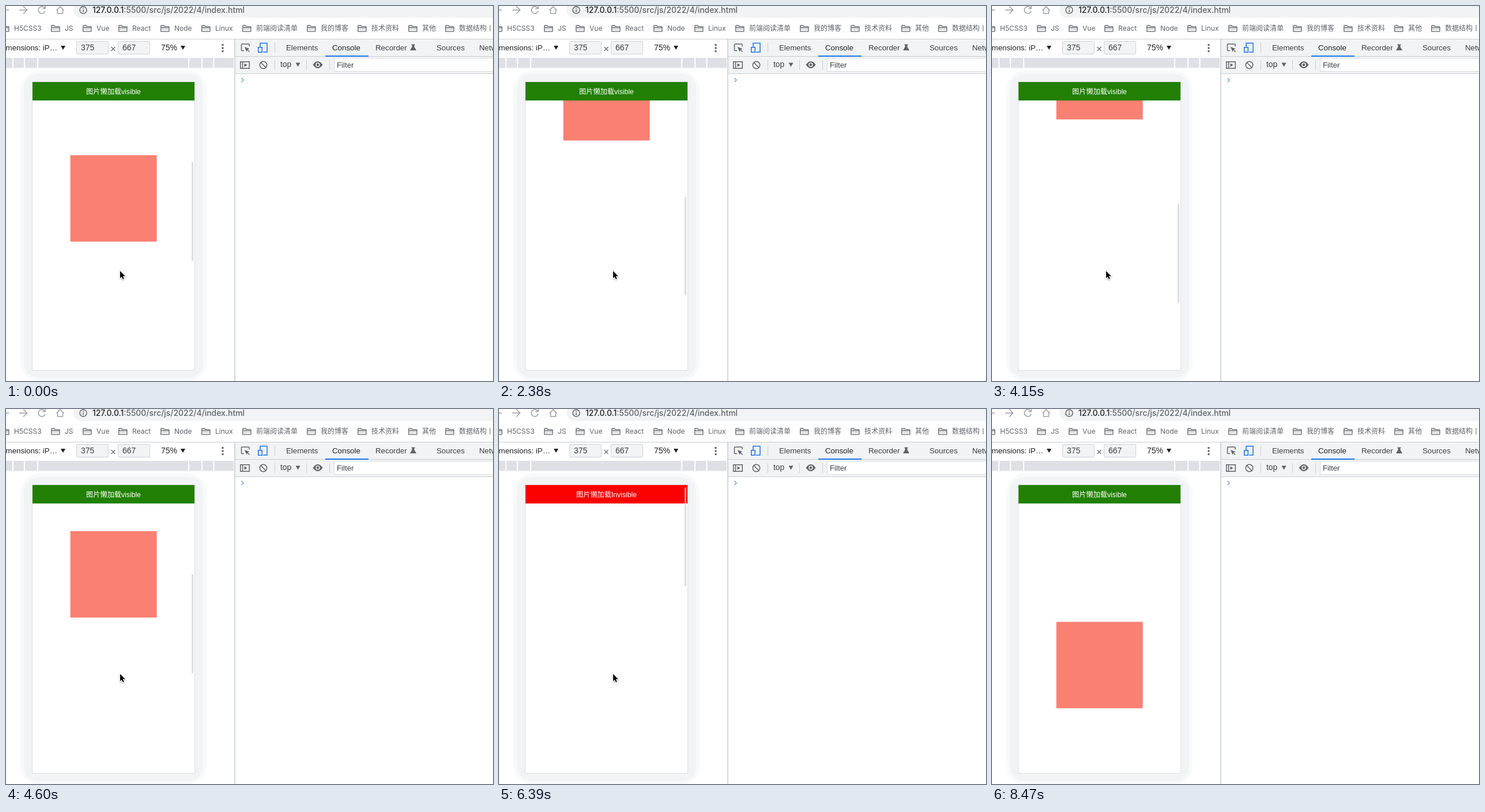
Recreate the animation shown at these times as an HTML page. Size 845 by 651 pixels, loop 9220 ms.

```html
<!DOCTYPE html>
<html lang="zh">
<head>
<meta charset="utf-8">
<title>图片懒加载</title>
<style>
  @property --y { syntax: "<number>"; inherits: true; initial-value: 259; }

  html, body { margin: 0; width: 100%; height: 100%; overflow: hidden; background: #fff; }
  svg { display: block; width: 845px; height: 651px; }
  text { font: 13.3px "Liberation Sans", Arial, "Noto Sans CJK SC", "Noto Sans CJK", sans-serif; fill: #3c4043; white-space: pre; }
  .bookmarks text { font: 12px Inter, "Noto Sans CJK SC", "Noto Sans CJK", sans-serif; fill: #5f6368; }
  .url { font: 500 13.95px Inter, sans-serif; fill: #5f6368; }
  .dark { fill: #202124; }
  .title text { font-size: 12.2px; font-weight: 500; fill: #fff; text-anchor: middle; }
  .line { fill: none; stroke: #5f6368; stroke-width: 1.5; }
  .edge { fill: none; stroke: #cacdd1; }

  /* --y is the top of the square; the scroll thumb follows it */
  .screen { animation: scroll 9.22s infinite; }
  .square { transform: translateY(calc(var(--y) * 1px)); }
  .thumb { transform: translateY(calc((271 - (var(--y) - 259) * .3425) * 1px)); animation: fade 9.22s infinite; }
  .hidden { animation: flag 9.22s step-end infinite; }
  .cursor { animation: leave 9.22s infinite; filter: drop-shadow(0 1px 1px #0005); }

  @keyframes scroll {
    0%     { --y: 259; animation-timing-function: steps(8); }
    12.9%  { --y: 204; animation-timing-function: steps(2); }
    16.15% { --y: 180; animation-timing-function: step-end; }
    19.3%  { --y: 180; animation-timing-function: steps(8); }
    32.21% { --y: -13; animation-timing-function: steps(3); }
    36.98% { --y: -77; animation-timing-function: step-end; }
    38.61% { --y: -77; animation-timing-function: steps(7); }
    49.89% { --y: 212; animation-timing-function: steps(6); }
    59.54% { --y: 426; animation-timing-function: steps(3); }
    64.42% { --y: 554; animation-timing-function: steps(2); }
    67.67% { --y: 640; animation-timing-function: step-end; }
    69.3%  { --y: 653; animation-timing-function: step-end; }
    70.93% { --y: 656; animation-timing-function: steps(3); }
    75.81% { --y: 640; animation-timing-function: step-end; }
    77.33% { --y: 618; animation-timing-function: steps(3); }
    82.21% { --y: 400; animation-timing-function: step-end; }
    83.83%, 100% { --y: 369.5; animation-timing-function: step-end; }
  }
  @keyframes fade {
    0%, 86.98% { opacity: 1; animation-timing-function: steps(2); }
    90.23%, 100% { opacity: 0; }
  }
  @keyframes flag {
    0%, 41.86%, 77.33%, 100% { opacity: 0; }
    33.83%, 67.67% { opacity: 1; }
  }
  @keyframes leave {
    0%, 85.46% { transform: none; opacity: 1; animation-timing-function: steps(3); }
    90.23% { transform: translate(415px, 38px); opacity: 1; animation-timing-function: step-end; }
    91.86%, 100% { transform: translate(415px, 38px); opacity: 0; }
  }
</style>
</head>
<body>
<svg viewBox="0 0 845 651">
  <defs>
    <g id="folder" stroke="#5f6368" stroke-width="1.2">
      <path d="M.7 43.5V34.7q0-1 1-1H5.5l1.5 1.8h7q1 0 1 1v7q0 1-1 1H1.7q-1 0-1-1z" fill="#e3e4e6"/>
      <path d="M.7 37.5h14.3" fill="none"/>
    </g>
    <path id="caret" d="M0 0h8l-4 7z"/>
    <clipPath id="viewport"><path d="M46 132h281v500H46z"/></clipPath>
  </defs>
  <path d="M0 0h845v651H0z" fill="#fff"/>

  <!-- address bar -->
  <rect x="117" y="-7" width="760" height="27.5" rx="13.7" fill="#f1f3f4"/>
  <g class="line">
    <g stroke="#9aa0a6">
      <path d="M-2 7H5M23 7h13M30 .5L36.5 7L30 13.5"/>
      <path d="M67 3.5A6 6 0 1 0 68 8.5M68 -1v5.5h-5"/>
      <path d="M87.5 7.5L94 1l6.5 6.5M89.5 6v7h9V6"/>
    </g>
    <circle cx="134" cy="7" r="6"/>
    <path d="M134 6v4.5M134 3v1.7"/>
  </g>
  <text class="url" x="150" y="12"><tspan class="dark">127.0.0.1</tspan>:5500/src/js/2022/4/index.html</text>

  <!-- bookmarks -->
  <g class="bookmarks">
    <g transform="translate(-10)"><use href="#folder"/><text x="24" y="43">H5CSS3</text></g>
    <g transform="translate(78)"><use href="#folder"/><text x="24" y="43">JS</text></g>
    <g transform="translate(133)"><use href="#folder"/><text x="24" y="43">Vue</text></g>
    <g transform="translate(195)"><use href="#folder"/><text x="24" y="43">React</text></g>
    <g transform="translate(268)"><use href="#folder"/><text x="24" y="43">Node</text></g>
    <g transform="translate(339)"><use href="#folder"/><text x="24" y="43">Linux</text></g>
    <g transform="translate(410)"><use href="#folder"/><text x="24" y="43">前端阅读清单</text></g>
    <g transform="translate(522)"><use href="#folder"/><text x="24" y="43">我的博客</text></g>
    <g transform="translate(610)"><use href="#folder"/><text x="24" y="43">技术资料</text></g>
    <g transform="translate(698)"><use href="#folder"/><text x="24" y="43">其他</text></g>
    <g transform="translate(762)"><use href="#folder"/><text x="24" y="43">数据结构丨</text></g>
  </g>
  <path class="edge" d="M0 57.5h845"/>

  <!-- device toolbar -->
  <text class="dark" x="89" y="77" text-anchor="end">mensions: iP…</text>
  <use href="#caret" x="95" y="69" fill="#202124"/>
  <g fill="#f1f3f4" stroke="#cfd1d4">
    <rect x="122.5" y="61.5" width="55" height="22" rx="2"/>
    <rect x="194.5" y="61.5" width="55" height="22" rx="2"/>
  </g>
  <text x="130" y="77" style="font-size:14px">375</text>
  <text x="202" y="77" style="font-size:14px">667</text>
  <path class="line" d="M182.5 71l7 7m0-7l-7 7" style="stroke-width:1.2"/>
  <text class="dark" x="269" y="77" style="font-size:14px">75%</text>
  <use href="#caret" x="303" y="69" fill="#202124"/>
  <g fill="#5f6368">
    <circle cx="376" cy="67.5" r="1.8"/><circle cx="376" cy="73" r="1.8"/><circle cx="376" cy="78.5" r="1.8"/>
  </g>
  <path d="M0 90h395v17.5H0z" fill="#dfe0e5"/>
  <path d="M12 90v18M32 90v18M55 90v18M317 90v18M340 90v18M360.5 90v18" stroke="#fff" stroke-width="2"/>

  <!-- phone -->
  <rect x="25" y="112" width="323" height="540" rx="34" fill="#f8f9fa"/>
  <rect x="31" y="118" width="311" height="528" rx="26" fill="#f1f3f4"/>
  <path d="M45.5 131.5h282v501h-282z" fill="#fff" stroke="#dddfe2"/>
  <g class="screen" clip-path="url(#viewport)">
    <rect class="square" x="111.6" width="150" height="150" fill="#fa8072"/>
    <g class="title">
      <path d="M46 132h281v32H46z" fill="#218003"/>
      <text x="186.5" y="153">图片懒加载visible</text>
      <g class="hidden">
        <path d="M46 132h281v32H46z" fill="#fb0000"/>
        <text x="186.5" y="153">图片懒加载Invisible</text>
      </g>
    </g>
    <rect class="thumb" x="322" width="3" height="171.5" rx="1" fill="#d0d2d6" fill-opacity=".75"/>
  </g>

  <!-- developer tools -->
  <path d="M398 58h447v59H398z" fill="#f1f3f4"/>
  <path class="edge" d="M397 58v593" stroke-width="2" stroke-opacity=".8"/>
  <path class="edge" d="M398 87.5h447M398 117.5h447M466.5 64v17M466.5 94v17M521.5 94v17M561.5 94v17"/>
  <path d="M554 86h75v2h-75z" fill="#1a73e8"/>
  <path d="M846 90.5H569.5v23H846" fill="#fff" stroke="#dadce0"/>
  <g class="line">
    <path d="M413 77.5h-3.5q-1 0-1-1V67q0-1 1-1H421q1 0 1 1v3"/>
    <path d="M414 71l8.5 3.3-3.6 1.5-1.5 3.6z" fill="#5f6368" stroke="none"/>
    <path d="M418.5 75.5l4 4"/>
    <path d="M406.75 96.75h15.5v11.5h-15.5zM410.5 97v11"/>
    <path d="M413.5 99.5v6l5-3z" fill="#5f6368" stroke="none"/>
    <circle cx="446.5" cy="102.5" r="6.2"/>
    <path d="M442 98l9 9"/>
    <path d="M441 72v-7.5h12v15.5h-7" stroke="#1a73e8"/>
    <path d="M437.75 71.75h6.5v8.5h-6.5z" stroke="#1a73e8"/>
    <path d="M408.5 125l3.5 3.5-3.5 3.5" stroke="#6fa5ea"/>
  </g>
  <path d="M532.5 102q8.5-12 17 0q-8.5 12-17 0z" fill="#5f6368"/>
  <circle cx="541" cy="102" r="3.8" fill="#f1f3f4"/>
  <circle cx="541" cy="102" r="2.2" fill="#5f6368"/>
  <path d="M703.5 66.5h6v1.5h-1v3l3.5 6h-11l3.5-6v-3h-1z" fill="#5f6368"/>
  <text x="486" y="77">Elements</text>
  <text class="dark" x="566" y="77">Console</text>
  <text x="641" y="77">Recorder</text>
  <text x="747" y="77">Sources</text>
  <text x="821" y="77">Network</text>
  <text x="476" y="106" style="font-size:13.8px">top</text>
  <use href="#caret" x="502.5" y="98.5" fill="#5f6368"/>
  <text x="574" y="107">Filter</text>

  <path class="cursor" d="M198 460v12.5l2.8-2.6 1.9 4.4 2-.9-1.9-4.3h4z" stroke="#fff" stroke-width="2" paint-order="stroke"/>
</svg>
</body>
</html>
```
